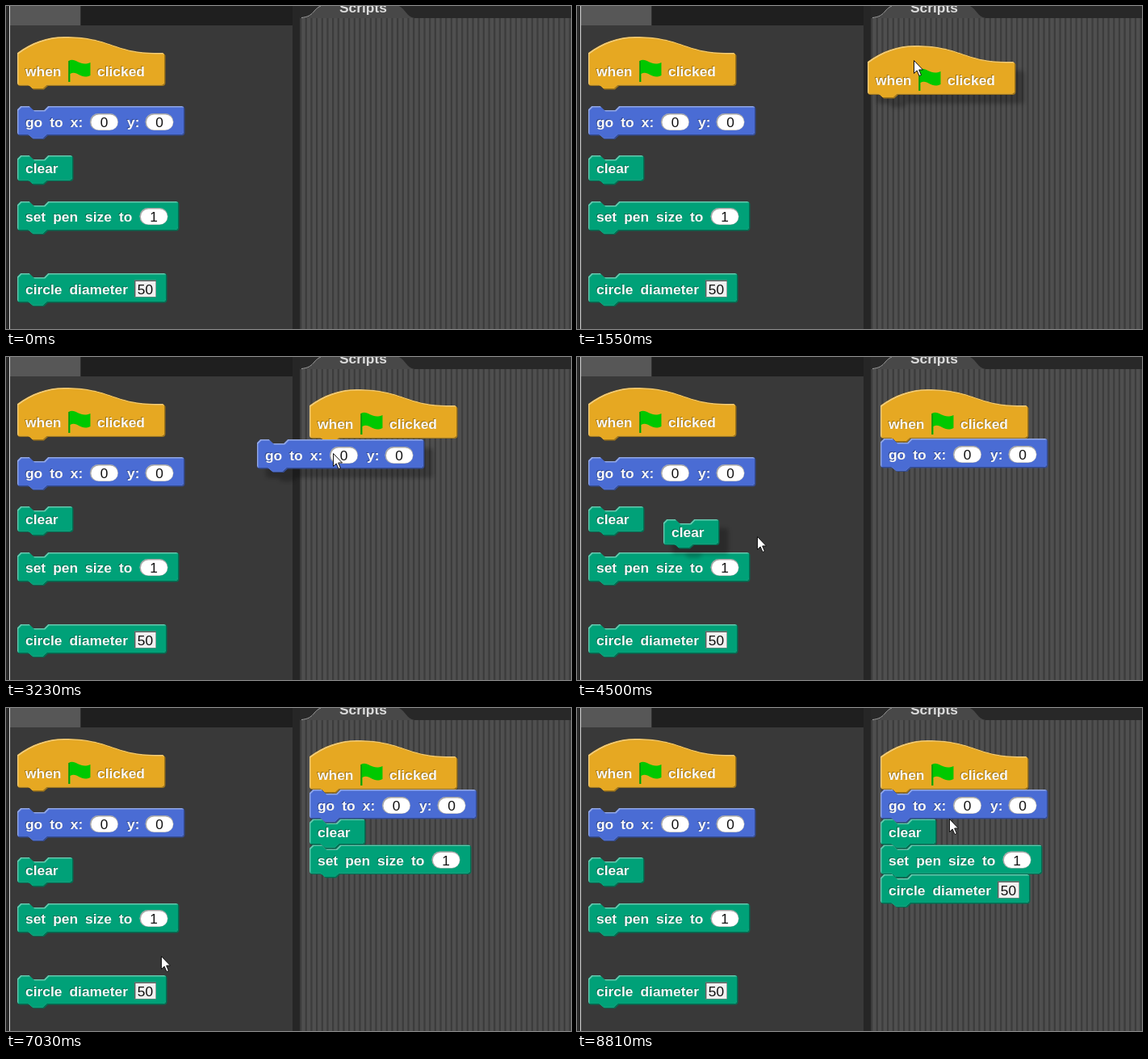
Animation, 700 px wide and 400 px high, one loop 9.24 s. Source, as an HTML page with a canvas:

```html
<!DOCTYPE html>
<html>
<head>
<meta charset="utf-8">
<style>
  html, body { margin: 0; width: 100%; height: 100%; overflow: hidden; background: #393939; }
  canvas { display: block; }
</style>
</head>
<body>
<canvas id="stage" width="700" height="400"></canvas>
<script>
const ctx = document.getElementById('stage').getContext('2d');
const LOOP = 9240, TICK = 40, PALETTE_X = 14, SCRIPT_X = 376, SCRIPT_Y = 40;
const FONT = '17.4px "Liberation Sans", Arial, sans-serif';

const orange = { base: '#e6a822', light: '#f0cb7a', dark: '#a17618' };
const blue = { base: '#4a6cd4', light: '#92a7e5', dark: '#344c94' };
const green = { base: '#00a178', light: '#66c7ae', dark: '#007154' };

// y: place in the palette, line: text baseline, grip: where the pointer holds the block
const blocks = [
  { y: 38, w: 183.5, h: 61, hat: true, color: orange, line: 48.5, grip: [50, 22],
    words: [['when', 10], ['clicked', 99]], flag: 63.5 },
  { y: 124, w: 207.5, h: 36.5, color: blue, line: 26, grip: [78, 17],
    words: [['go to x:', 10], ['y:', 136]], fields: [['0', 107.5], ['0', 176]] },
  { y: 185, w: 69.5, h: 32, color: green, line: 22, grip: [43, 22], words: [['clear', 10]] },
  { y: 242, w: 200.5, h: 36.5, color: green, line: 25, grip: [84, 29],
    words: [['set pen size to', 10]], fields: [['1', 169]] },
  { y: 331, w: 185.5, h: 36.5, color: green, line: 25.5, grip: [33, 25],
    words: [['circle diameter', 10]], fields: [['50', 158.5, true]] }
];

let stackY = SCRIPT_Y;
for (const b of blocks) {
  b.top = stackY;
  stackY += b.h;
  b.path = outline(b);
}

// Each move begins where the one before ended
const moves = [];
let hand = [388, 360];

function glide(x, y, start, end, { pow = 2, sag = 0, block } = {}) {
  moves.push({ from: hand, to: [x, y], start, end, pow, sag, block });
  hand = [x, y];
}

function reach(block, start, end, style) {
  const { y, grip } = blocks[block];
  glide(PALETTE_X + grip[0], y + grip[1], start, end, style);
}

// dx, dy: how far from its slot the block is let go
function drag(block, start, end, { dx = 0, dy = 0, ...style }) {
  const { top, grip } = blocks[block];
  glide(SCRIPT_X + dx + grip[0], top + dy + grip[1], start, end, { ...style, block });
}

reach(0, 310, 710);
drag(0, 1070, 1710, { pow: 2.7, sag: 55 });
reach(1, 1930, 2490);
drag(1, 2670, 3590, { pow: 1.65, sag: -6, dx: 35 });
reach(2, 3770, 4250);
drag(2, 4420, 5060, { pow: 4.6, sag: 35, dy: 4 });
glide(118, 214, 5330, 5530);
reach(3, 5720, 5960);
drag(3, 6040, 6680, { pow: .85, sag: 21, dx: -22, dy: 9 });
reach(4, 6860, 7270, { sag: 7 });
drag(4, 7490, 8170, { dy: 5 });
glide(443, 157, 8200, 8480, { pow: 1 });
glide(461, 137, 8650, 8810);

function pointAt({ from, to, start, end, pow, sag }, t) {
  const u = Math.min(1, Math.max(0, (t - start) / (end - start)));
  const s = 1 - (1 - u) ** pow;
  return [from[0] + (to[0] - from[0]) * s,
          from[1] + (to[1] - from[1]) * s + 4 * sag * s * (1 - s)];
}

function outline({ w, h, hat }) {
  const p = new Path2D(), r = 5;
  if (hat) {
    p.moveTo(0, 20);
    p.bezierCurveTo(17, 7, 37, 0, 58, 0);
    p.bezierCurveTo(117, 0, 117, 20, 175, 20);
    p.lineTo(w - 3, 20);
    p.lineTo(w, 23);
  } else {
    p.moveTo(0, 4);
    p.lineTo(4, 0);
    p.lineTo(15, 0);
    p.lineTo(20, r);
    p.lineTo(33, r);
    p.lineTo(38, 0);
    p.lineTo(w - 4, 0);
    p.quadraticCurveTo(w, 0, w, 4);
  }
  p.lineTo(w, h - 4);
  p.quadraticCurveTo(w, h, w - 4, h);
  p.lineTo(38, h);
  p.lineTo(33, h + 4.5);
  p.lineTo(20, h + 4.5);
  p.lineTo(15, h);
  p.lineTo(4, h);
  p.quadraticCurveTo(0, h, 0, h - 4);
  p.closePath();
  return p;
}

function shifted(path, d) {
  const p = new Path2D();
  p.addPath(path, new DOMMatrix([1, 0, 0, 1, d, d]));
  return p;
}

function fillPath(path, color) {
  ctx.fillStyle = color;
  ctx.fill(path);
}

function rect(color, x, y, w, h) {
  ctx.fillStyle = color;
  ctx.fillRect(x, y, w, h);
}

function label(text, x, y, color) {
  ctx.font = 'bold ' + FONT;
  ctx.wordSpacing = '4.2px';
  ctx.textAlign = 'left';
  ctx.fillStyle = color;
  ctx.fillText(text, x, y);
}

function drawFlag(x) {
  ctx.save();
  ctx.translate(x, 28);
  fillPath(new Path2D('M0 2C9-3 14 10 27 4V20C15 26 11 13 2 18V28H0Z'), '#00c800');
  rect('#00900a', 0, 2, 1.3, 26);
  ctx.restore();
}

function drawField([text, cx, boxed], line) {
  const w = boxed ? 27 : 35, h = 21, y = line - 17;
  const shape = new Path2D();
  shape.roundRect(cx - w / 2, y, w, h, boxed ? 0 : h / 2);
  fillPath(shape, boxed ? '#f0f0f0' : '#fff');
  ctx.save();
  ctx.clip(shape);
  ctx.strokeStyle = boxed ? 'rgba(0,0,0,.6)' : 'rgba(0,0,0,.35)';
  ctx.lineWidth = 2;
  ctx.stroke(shifted(shape, .5));
  ctx.restore();
  ctx.font = FONT;
  ctx.textAlign = 'center';
  ctx.fillStyle = '#111';
  ctx.fillText(text, cx, line);
}

function drawBlock(b, x, y, lifted) {
  const { base, light, dark } = b.color;
  ctx.save();
  ctx.translate(x, y);
  if (lifted) {
    ctx.shadowColor = 'rgba(0,0,0,.25)';
    ctx.shadowBlur = 5;
    ctx.shadowOffsetX = ctx.shadowOffsetY = 11;
  }
  fillPath(b.path, dark);
  ctx.shadowColor = 'transparent';
  // bevel: light along the top and left, dark along the bottom and right
  ctx.save();
  ctx.clip(b.path);
  ctx.clip(shifted(b.path, -1.5));
  fillPath(b.path, light);
  ctx.clip(shifted(b.path, 1.4));
  fillPath(b.path, base);
  ctx.restore();

  for (const [text, tx] of b.words) {
    label(text, tx - 1, b.line - 1, dark);
    label(text, tx, b.line, '#f8f8f8');
  }
  if (b.flag) drawFlag(b.flag);
  for (const f of b.fields || []) drawField(f, b.line);
  ctx.restore();
}

function drawWindow() {
  rect('#393939', 0, 0, 700, 400);
  rect('#2a2a2a', 0, 0, 4, 400);
  rect('#d8d8d8', 4, 0, 1, 400);
  rect('#575757', 5, 0, 87.5, 24);
  rect('#1f1f1f', 92.5, 0, 271.5, 24);
  rect('#262626', 355, 0, 9, 400);
  rect('#282828', 364, 0, 336, 15);

  rect('#4f4f4f', 364, 15, 336, 385);
  for (let x = 364; x < 700; x += 6.67) rect('#3c3c3c', x, 15, 2.2, 385);

  fillPath(new Path2D('M366 15C382 14 380 4 390 0H487C495 4 496 13 506 15Z'), '#484848');
  ctx.strokeStyle = '#a0a0a0';
  ctx.lineWidth = 1;
  ctx.stroke(new Path2D('M366 14.5C382 13 380 4 390 0'));
  label('Scripts', 413, 8, '#dcdcdc');
}

function drawPointer(x, y) {
  ctx.save();
  ctx.translate(x + .5, y + .5);
  const arrow = new Path2D('M0 0V16L3.7 12.5L6.5 19L9 18L6.2 11.5H11Z');
  fillPath(arrow, '#fff');
  ctx.strokeStyle = '#111';
  ctx.lineWidth = 1;
  ctx.stroke(arrow);
  ctx.restore();
}

// White bar that marks where the lifted block will attach
function drawTarget(index, x, y) {
  const above = blocks[index - 1];
  if (!above || Math.abs(x - SCRIPT_X) > 45 || Math.abs(y - blocks[index].top) > 25) return;
  rect('#fff', SCRIPT_X, above.top + above.h + 4, above.w + 1, 4);
}

function draw(t) {
  drawWindow();
  for (const b of blocks) drawBlock(b, PALETTE_X, b.y);

  const done = moves.filter(m => m.start <= t), move = done.pop();
  if (!move) return;
  const now = move.start + Math.floor((t - move.start) / TICK) * TICK;

  for (const { block } of done)
    if (block !== undefined) drawBlock(blocks[block], SCRIPT_X, blocks[block].top);

  if (move.block !== undefined) {
    // the lifted block trails the pointer by one tick
    const b = blocks[move.block];
    const [x, y] = pointAt(move, now - TICK).map((v, i) => Math.round(v - b.grip[i]));
    drawTarget(move.block, x, y);
    drawBlock(b, x, y, true);
  }
  drawPointer(...pointAt(move, now).map(Math.round));
}

const begin = performance.now();
function frame() {
  draw((performance.now() - begin) % LOOP);
  requestAnimationFrame(frame);
}
frame();
</script>
</body>
</html>
```
